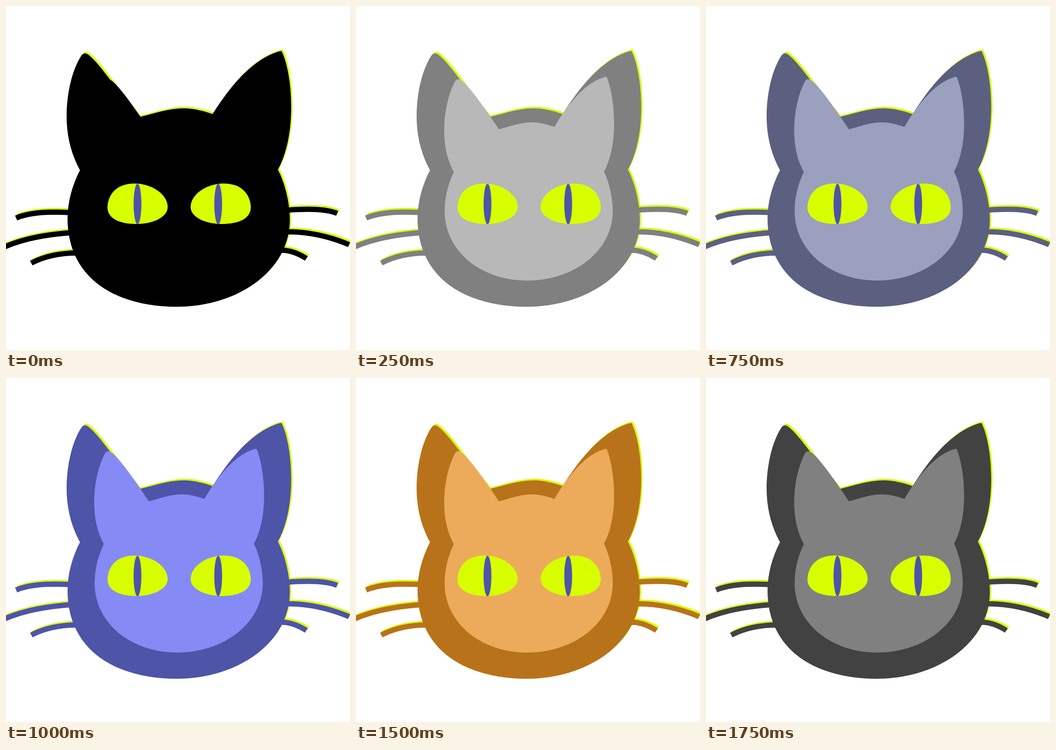
An HTML page for the animation above (2 s loop, 749 px wide and 748 px high).

```html
<!DOCTYPE html>
<html lang="en">
<head>
<meta charset="utf-8">
<title>Cat changing coats</title>
<style>
  html, body { margin: 0; width: 100%; height: 100%; overflow: hidden; background: #fff; }
  svg { display: block; width: 100vw; height: 100vh; }
  #rim { color: #d7ff00; }
  #face { fill: currentColor; }
  .eye { fill: #d7ff00; }
  .pupil { fill: #4e54a8; }
</style>
</head>
<body>
<svg viewBox="0 0 749 748" preserveAspectRatio="none">
  <defs>
    <g id="cat">
      <path fill="currentColor" d="M161 357 C142 322 132 284 132 240 C132 195 142 142 164 108
        Q170 100 178 105 C202 122 234 173 290 241.5
        C325 233 355 222.5 387 222.5 C408 222.5 430 228 450 235
        C485 179 535 115 597 98 Q600 97 601 100
        C614 128 621 175 621 220 C621 270 612 320 592 356
        C606 382 618 425 618 465 C618 575 505 654 372 654
        C236 654 134 590 134 462 C134 427 144 390 161 357 Z"/>
      <g fill="none" stroke="currentColor" stroke-width="11.5">
        <path d="M22 461 C50 449 85 447 140 449"/>
        <path d="M-8 526 C35 506 85 497 140 493"/>
        <path d="M55 559 C80 546 110 537 155 537"/>
        <path d="M612 444 C650 441 695 440 721 451"/>
        <path d="M612 491 C655 490 705 501 747 519"/>
        <path d="M600 531 C615 531 635 537 654 549"/>
      </g>
    </g>
    <path id="eye" d="M221 438 C221 420 232 386 280 386 C318 386 352 410 352 437
      C352 460 318 474 285 474 C240 474 221 458 221 438 Z"/>
  </defs>

  <!-- The rim light is the same silhouette, nudged up and right -->
  <use id="rim" href="#cat" transform="translate(3 -3.5)"/>
  <use id="coat" href="#cat"/>
  <path id="face" d="M213 361 C199 336 192 306 192 270 C192 233 201 191 215 165
    Q219 157 226 160 C238 165 264 199 292 240 L311 268
    C335 262 358 253 383 253 C400 253 417 258 432 263
    C458 219 497 166 543 154 Q545 153 547 157
    C557 184 562 222 562 256 C562 295 555 333 540 360
    C552 386 559 417 559 446 C559 533 474 597 372 597
    C272 597 193 533 193 446 C193 417 200 388 213 361 Z"/>

  <use class="eye" href="#eye"/>
  <use class="eye" href="#eye" transform="translate(754 0) scale(-1 1)"/>
  <ellipse class="pupil" cx="286.3" cy="430.5" rx="8.5" ry="44"/>
  <ellipse class="pupil" cx="462" cy="430.5" rx="8.5" ry="44"/>
</svg>
<script>
  const LOOP = 2000;
  // Coat and face colour, each held for an equal share of the loop
  const coats = [
    ['#000000', '#000000'],
    ['#808080', '#b8b8b8'],
    ['#ffffff', '#ffffff'],
    ['#5b6080', '#9aa0bd'],
    ['#4e54a8', '#868af5'],
    ['#4c3010', '#8c6433'],
    ['#b8731a', '#ecab5a'],
    ['#424242', '#808080']
  ];

  function cycle(id, part) {
    const steps = [...coats, coats[0]].map((coat, i) => ({
      color: coat[part],
      offset: i / coats.length,
      easing: 'step-end'
    }));
    document.getElementById(id).animate(steps, { duration: LOOP, iterations: Infinity });
  }

  cycle('coat', 0);
  cycle('face', 1);
</script>
</body>
</html>
```
